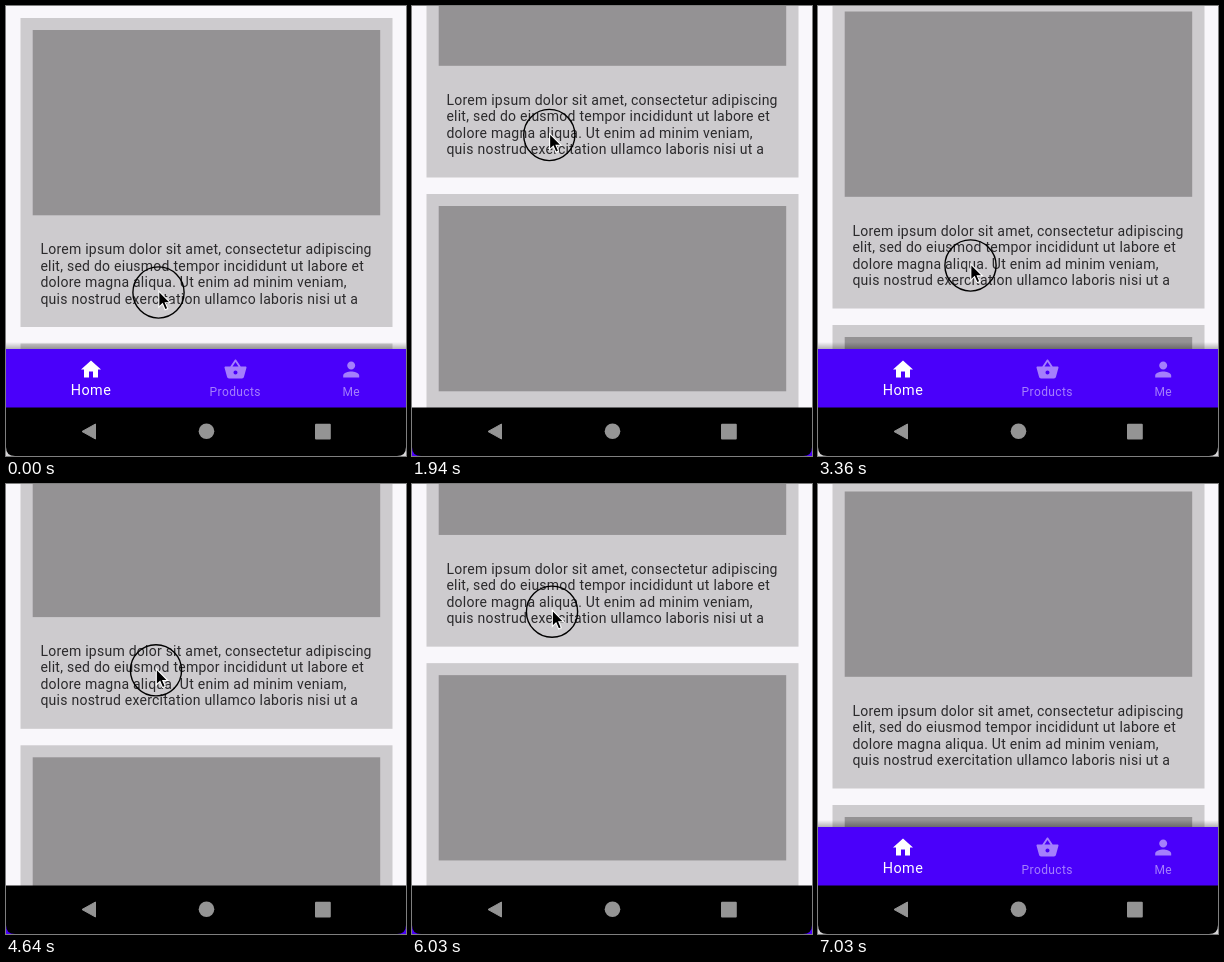
Write an HTML page that moves like this. It is 400x450 px and loops after 7910 ms.

```html
<!DOCTYPE html>
<html lang="en">
<head>
<meta charset="utf-8">
<title>Hiding navigation bar</title>
<style>
  html, body { margin: 0; width: 100%; height: 100%; overflow: hidden; background: #d6d5d7; }
  svg { display: block; width: 100%; height: 100%; font-family: Roboto, sans-serif; }
  .copy { font-size: 14px; letter-spacing: .25px; fill: #2b2a2c; }
  .label { font-size: 12px; letter-spacing: .4px; text-anchor: middle; }
  .active { font-size: 14.4px; letter-spacing: .5px; }
</style>
</head>
<body>
<svg viewBox="0 0 400 450">
  <defs>
    <linearGradient id="shade" x1="0" y1="0" x2="0" y2="1">
      <stop offset="0" stop-color="#000" stop-opacity="0"/>
      <stop offset="1" stop-color="#000" stop-opacity=".28"/>
    </linearGradient>
    <g id="card">
      <rect x="14.5" y="12" width="372" height="309" fill="#cdcbce"/>
      <rect x="26.7" y="24" width="347.5" height="185.3" fill="#949294"/>
      <g class="copy">
        <text x="34.4" y="248">Lorem ipsum dolor sit amet, consectetur adipiscing</text>
        <text x="34.4" y="264.5">elit, sed do eiusmod tempor incididunt ut labore et</text>
        <text x="34.4" y="281">dolore magna aliqua. Ut enim ad minim veniam,</text>
        <text x="34.4" y="297.5">quis nostrud exercitation ullamco laboris nisi ut a</text>
      </g>
    </g>
  </defs>

  <rect width="400" height="420" fill="#f9f7fb"/>
  <g id="list">
    <use href="#card"/>
    <use href="#card" y="325.5"/>
  </g>

  <g id="nav">
    <rect y="336" width="400" height="7" fill="url(#shade)"/>
    <rect y="343" width="400" height="60" fill="#4a00fa"/>
    <g fill="#fff">
      <path transform="translate(73 351.5)" d="M10 20v-6h4v6h5v-8h3L12 3 2 12h3v8z"/>
      <text class="label active" x="85" y="389">Home</text>
    </g>
    <g fill="#a57ffc">
      <path transform="translate(217.5 351.5)" d="M17.21 9l-4.38-6.56c-.19-.28-.51-.42-.83-.42-.32 0-.64.14-.83.43L6.79 9H2c-.55 0-1 .45-1 1 0 .09.01.18.04.27l2.54 9.27c.23.84 1 1.46 1.92 1.46h13c.92 0 1.69-.62 1.93-1.46l2.54-9.27L23 10c0-.55-.45-1-1-1h-4.79zM9 9l3-4.4L15 9H9zm3 8c-1.1 0-2-.9-2-2s.9-2 2-2 2 .9 2 2-.9 2-2 2z"/>
      <text class="label" x="229.3" y="389.5">Products</text>
      <path transform="translate(333.2 351.5)" d="M12 12c2.21 0 4-1.79 4-4s-1.79-4-4-4-4 1.79-4 4 1.79 4 4 4zm0 2c-2.67 0-8 1.34-8 4v2h16v-2c0-2.66-5.33-4-8-4z"/>
      <text class="label" x="345.2" y="389.5">Me</text>
    </g>
  </g>

  <path d="M0 401.5H400V441Q400 450 391 450H9Q0 450 0 441Z" fill="#000"/>
  <g fill="#949494">
    <path d="M76 425.5L89.5 418V433Z" stroke="#949494" stroke-linejoin="round"/>
    <circle cx="200.5" cy="425.3" r="7.8"/>
    <rect x="309" y="417.8" width="15.8" height="15.6" rx="1"/>
  </g>

  <g id="pointer">
    <circle r="25.6" fill="none" stroke="#000" stroke-width="1.4"/>
    <path transform="translate(.3 -1.5)" d="M0 0V16.2L3.7 12.7 6.3 18.8 9 17.6 6.5 11.7H11.5Z" fill="#000" stroke="#fff" stroke-width="1.1"/>
  </g>
</svg>
<script>
const LOOP = 7910;
const NAV_TRAVEL = 68;
const [list, nav, pointer] = ['list', 'nav', 'pointer'].map(id => document.getElementById(id));

// Keys are [time, value]
const scrollKeys = [[0, 0], [120, 0], [480, -6], [820, -47.5], [1390, -149.5], [1945, -149.5],
  [2080, -138], [2600, -44], [2780, -24], [3360, -18.5], [3580, -17], [4200, -14.5], [4360, -17],
  [4640, -76], [5180, -179], [5830, -179], [6030, -158.5], [6480, -48], [6650, -24],
  [7030, -16.5], [LOOP, -16.5]];
const yKeys = [[0, 286.5], [400, 279], [820, 217.3], [1330, 137], [1419, 136.5], [1940, 129],
  [2050, 142], [2500, 234], [2680, 254], [3360, 259.5], [4100, 263], [4260, 261], [4640, 186.5],
  [5110, 98], [5820, 98], [6030, 127.5], [6380, 230], [6550, 253], [6950, 260.5], [LOOP, 260.5]];
const xKeys = [[0, 152.5], [820, 151.8], [1330, 138], [1940, 137.3], [2500, 150], [3360, 152.5],
  [4260, 152.5], [4640, 150], [5110, 135.5], [5820, 135.5], [6030, 140], [6500, 151], [LOOP, 152]];
const touches = [[0, 1420], [1940, 5210], [5820, 7030]];
const navMoves = [[220, 'hide'], [2150, 'show'], [4310, 'hide'], [6040, 'show']];

const clamp = v => Math.max(0, Math.min(1, v));

// Smooth curve through the keys that never overshoots them
function track(keys, t) {
  const last = keys.length - 1;
  let i = 0;
  while (i < last - 1 && t >= keys[i + 1][0]) i++;
  const rate = k => (keys[k + 1][1] - keys[k][1]) / (keys[k + 1][0] - keys[k][0]);
  const slope = k => {
    if (k === 0 || k === last) return 0;
    const a = rate(k - 1), b = rate(k);
    return a * b > 0 ? 2 * a * b / (a + b) : 0;
  };
  const [t0, v0] = keys[i], [t1, v1] = keys[i + 1];
  const d = t1 - t0, u = clamp((t - t0) / d), w = 1 - u;
  return v0 * w * w * (1 + 2 * u) + v1 * u * u * (3 - 2 * u)
    + d * u * w * (slope(i) * w - slope(i + 1) * u);
}

function navShift(t) {
  let shift = 0;
  for (const [start, kind] of navMoves) {
    if (t < start) break;
    shift = kind === 'hide'
      ? clamp((t - start) / 175) ** 2
      : (1 - clamp((t - start) / 225)) ** 3;
  }
  return shift * NAV_TRAVEL;
}

function move(node, x, y) {
  node.setAttribute('transform', `translate(${x.toFixed(2)} ${y.toFixed(2)})`);
}

function draw(t) {
  move(list, 0, track(scrollKeys, t));
  move(nav, 0, navShift(t));
  move(pointer, track(xKeys, t), track(yKeys, t));
  const touching = touches.some(([from, to]) => t >= from && t < to);
  pointer.setAttribute('visibility', touching ? 'visible' : 'hidden');
}

const begin = performance.now();
function tick() {
  draw((performance.now() - begin) % LOOP);
  requestAnimationFrame(tick);
}
draw(0);
requestAnimationFrame(tick);
</script>
</body>
</html>
```
